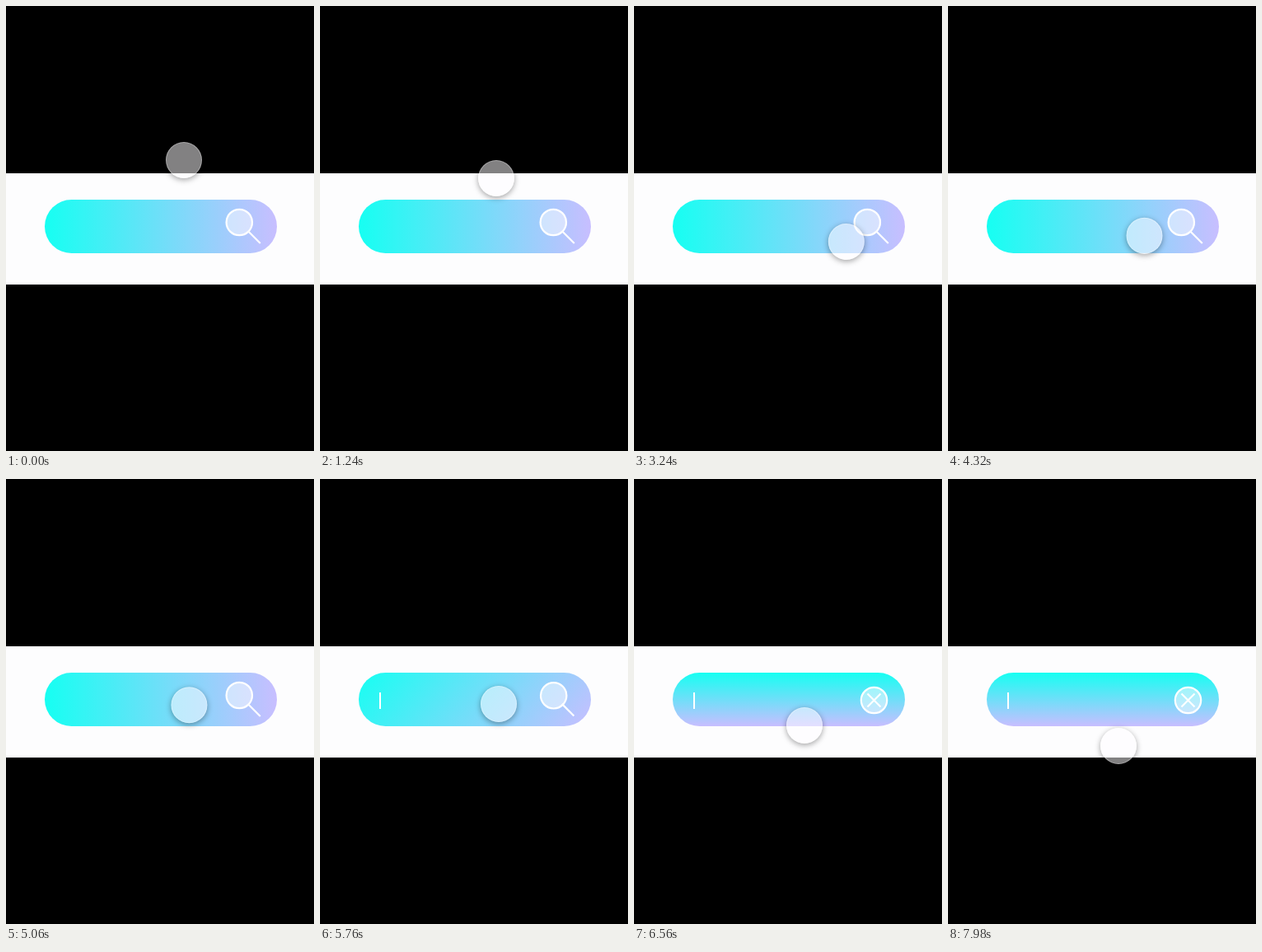
Write an HTML page that moves like this. It is 374 by 540 pixels and loops after 8000 ms.

```html
<!DOCTYPE html>
<html lang="en">
<head>
<meta charset="utf-8">
<title>Search field</title>
<style>
  html, body { margin: 0; width: 100%; height: 100%; overflow: hidden; background: #000; }
  div, svg { position: absolute; }
  #stage { left: 0; top: 0; width: 374px; height: 540px; overflow: hidden; background: #000; }
  #band { top: 203px; width: 374px; height: 135px; background: #fdfdfe; }
  #pill { left: 47px; top: 235px; width: 282px; height: 65px; border-radius: 33px; }
  #caret { left: 72px; top: 259px; width: 2px; height: 20px; background: #fff; }
  #ball {
    left: -22px; top: -22px; width: 44px; height: 44px; box-sizing: border-box;
    border: 1px solid rgba(255, 255, 255, .3); border-radius: 50%;
    background: rgba(255, 253, 255, .51);
    box-shadow: 0 2px 7px rgba(0, 0, 0, .36);
  }
  svg { left: 0; top: 0; fill: none; stroke: #fff; stroke-width: 2.2; }
</style>
</head>
<body>
<div id="stage">
  <div id="band"></div>
  <div id="pill"></div>
  <div id="caret"></div>
  <svg width="374" height="540">
    <g id="icon">
      <circle r="15.7" fill="#fff" fill-opacity=".48"/>
      <path id="lines"/>
    </g>
  </svg>
  <div id="ball"></div>
</div>
<script>
const LOOP = 8000;
const $ = id => document.getElementById(id);
const mix = (a, b, p) => a + (b - a) * p;
const ramp = (n, from, to) => Math.min(1, Math.max(0, (n - from) / (to - from)));
const ease = p => p * p * (3 - 2 * p);

// Moves of the ball: first step, last step, end point
const start = [216, 187];
const moves = [
  [8, 26, 214, 209], [27, 50, 250, 305], [52, 68, 258, 284], [68, 84, 256, 306],
  [84, 94, 238, 278], [94, 118, 217, 273], [127, 141, 207, 299], [141, 160, 207, 324]
];

function ballAt(n) {
  let [x, y] = start;
  for (const [from, to, toX, toY] of moves) {
    const p = ease(ramp(n, from, to));
    x = mix(x, toX, p);
    y = mix(y, toY, p);
  }
  return [x, y];
}

// Three steps per 140 ms, the third one held longest
function stepAt(t) {
  const u = t + 20;
  return 3 * Math.floor(u / 140) + Math.min(2, Math.floor(u % 140 / 20));
}

function draw(now) {
  const n = stepAt(now % LOOP);

  const [x, y] = ballAt(n);
  $('ball').style.transform = `translate(${x}px, ${y}px)`;

  const swell = Math.sin(Math.PI * ramp(n, 125, 139));
  const pill = $('pill').style;
  pill.transform = `scale(${1 + .04 * swell}, ${1 + .09 * swell})`;
  const angle = mix(90, 180, ease(ramp(n, 118, 133)));
  pill.background = `linear-gradient(${angle}deg, #16fff2, #c8beff)`;

  $('caret').style.opacity = ramp(n, 119, 124);
  $('caret').style.transform = `translateX(${-4 * swell}px)`;

  // Magnifier handle slides in to become one arm of the cross
  const m = ease(ramp(n, 123, 138));
  const from = mix(11, -8, m), to = mix(25.5, 8, m), arm = 8 * ramp(m, .5, 1);
  $('icon').setAttribute('transform', `translate(${mix(283.3, 291.5, m)} ${mix(262.5, 268.5, m)})`);
  $('lines').setAttribute('d', `M${from} ${from}L${to} ${to}` +
    (arm ? `M${arm} ${-arm}L${-arm} ${arm}` : ''));

  requestAnimationFrame(draw);
}
requestAnimationFrame(draw);
</script>
</body>
</html>
```
